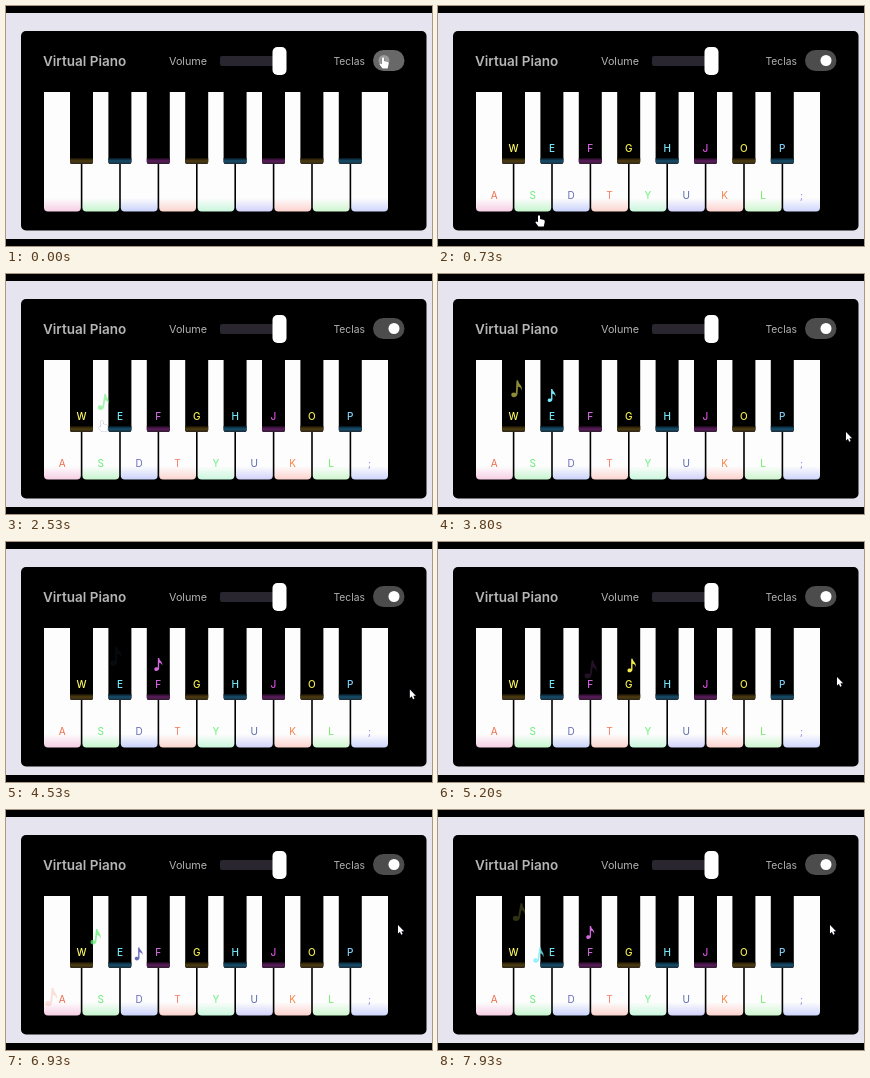
Write an HTML page with a canvas that moves like this. It is 426 px wide and 240 px high and loops after 8000 ms.

```html
<!DOCTYPE html>
<html lang="en">
<head>
<meta charset="utf-8">
<title>Virtual Piano</title>
<style>
  html, body { margin: 0; width: 100%; height: 100%; overflow: hidden; background: #000; }
  canvas { display: block; width: 426px; height: 240px; }
</style>
</head>
<body>
<canvas id="stage"></canvas>
<script>
const LOOP = 8000, KEY_TOP = 86, PITCH = 38.4, FONT = 'Inter, "Open Sans", sans-serif';
const canvas = document.getElementById('stage');
const ctx = canvas.getContext('2d');
const ratio = window.devicePixelRatio || 1;
canvas.width = 426 * ratio;
canvas.height = 240 * ratio;

const whiteLabels = 'ASDTYUKL;';
const blackLabels = 'WEFGHJOP';
const whiteInk = ['#ee6c4c', '#66ee76', '#666cba', '#f87e66', '#66f47a', '#5468b8', '#f48048', '#6cec60', '#8688e0'];
const whiteGlow = ['#f6cde4', '#c4f4cc', '#c8d0fa', '#fad2cc', '#c8f6dc', '#d0d0fa', '#fcd0cc', '#ccf6cc', '#ccd4fc'];
const blackInk = ['#fcf860', '#74ecfc', '#d468e0', '#f8f250', '#74ecfc', '#e04ce0', '#f4ec50', '#80d0fc'];
const blackGlow = ['#4e3d10', '#15506e', '#5c1c5c'];

const whiteCenter = i => 56.3 + i * PITCH;
const blackCenter = i => 75.5 + i * PITCH;

// Each note drifts from the centre of its key towards (dx, dy) while it fades.
const NOTE_LIFE = 800;
const notes = [
  { key: 'S', at: 2030, dx: 5, dy: -27, turn: .25 },
  { key: 'W', at: 3270, dx: 5, dy: -11, turn: .08 },
  { key: 'E', at: 3750, dx: -4, dy: -8, turn: 0 },
  { key: 'F', at: 4470, dx: 1, dy: 6, turn: .15 },
  { key: 'G', at: 5080, dx: 20, dy: 10, turn: .1 },
  { key: 'A', at: 6214, dx: -12, dy: 47, turn: .1 },
  { key: 'S', at: 6547, dx: -10, dy: -38, turn: .2 },
  { key: 'D', at: 6880, dx: -6, dy: -18, turn: 0 },
  { key: 'W', at: 7213, dx: 7, dy: -22, turn: .2 },
  { key: 'E', at: 7546, dx: -27, dy: 48, turn: .3 },
  { key: 'F', at: 7870, dx: 0, dy: 5, turn: .05 }
];

// Pointer stops: time, x, y
const pointerPath = [
  [0, 377, 51], [180, 377, 51], [700, 101, 209], [1000, 101, 209], [1800, 96, 146],
  [2650, 96, 146], [3300, 408, 158], [4200, 408, 158], [4900, 399, 135],
  [5600, 399, 135], [6300, 392, 115], [LOOP, 392, 115]
];

const clamp = v => Math.min(1, Math.max(0, v));
const ease = v => v * v * (3 - 2 * v);

function box(x, y, w, h, radius, fill) {
  ctx.beginPath();
  ctx.roundRect(x, y, w, h, radius);
  ctx.fillStyle = fill;
  ctx.fill();
}

function text(str, x, y, size, color, align = 'left', weight = 400) {
  ctx.font = `${weight} ${size}px ${FONT}`;
  ctx.textAlign = align;
  ctx.fillStyle = color;
  ctx.fillText(str, x, y);
}

function fade(y1, y2, ...colors) {
  const g = ctx.createLinearGradient(0, y1, 0, y2);
  colors.forEach((c, i) => g.addColorStop(i / (colors.length - 1), c));
  return g;
}

function drawHeader(t) {
  text('Virtual Piano', 37, 59.5, 13.5, '#b6b6b6', 'left', 600);
  text('Volume', 163, 58.5, 10.8, '#b2b2b2');
  box(214, 50, 60, 10, 2, '#2a2630');
  box(266.5, 41, 14, 28, 5, '#fff');
  text('Teclas', 327.5, 58.5, 10.3, '#b2b2b2');
  const on = ease(clamp((t - 80) / 300));
  const mix = (a, b) => `rgb(${Array(3).fill(a + (b - a) * on)})`;
  box(367, 44, 31.5, 21, 10.5, mix(104, 76));
  box(372.5 + 10 * on, 49, 11, 11, 5.5, mix(155, 255));
}

function drawKeys(labelled) {
  [...whiteLabels].forEach((label, i) => {
    const x = 38 + i * PITCH;
    box(x, KEY_TOP, 36.8, 119.5, [0, 0, 4, 4], fade(192, 206, '#fdfdfd', whiteGlow[i]));
    if (labelled) text(label, whiteCenter(i), 193, 10, whiteInk[i], 'center');
  });
  [...blackLabels].forEach((label, i) => {
    const x = 64 + i * PITCH;
    box(x, KEY_TOP, 23, 72, [0, 0, 2, 2], '#000');
    box(x, 152, 23, 6, [0, 0, 2, 2], fade(151, 159, '#000', blackGlow[i % 3], '#201c20'));
    if (labelled) text(label, blackCenter(i), 146, 10, blackInk[i], 'center', 500);
  });
}

const quaver = new Path2D(
  'M-.6 3.5 V-6.7 H.8 C1 -3.5 4.8 -3.2 4 1.4 C3.6 -.8 2.2 -1.6 .8 -1.7 ' +
  'V4 C.8 7.4 -4.2 7.8 -4.2 5 C-4.2 3.1 -2.1 2.6 -.6 3.5 Z');

function drawNote({ key, at, dx, dy, turn }, t) {
  const age = (t - at) / NOTE_LIFE;
  if (age < 0 || age >= 1) return;
  const white = whiteLabels.indexOf(key), black = blackLabels.indexOf(key);
  const isWhite = white >= 0;
  const x = isWhite ? whiteCenter(white) : blackCenter(black);
  const y = isWhite ? 145 : 122;
  const scale = .92 + .5 * age;
  ctx.save();
  ctx.translate(x + dx * age, y + dy * age);
  ctx.rotate(turn * age);
  ctx.scale(scale, scale);
  ctx.globalAlpha = 1 - age * age;
  ctx.fillStyle = isWhite ? whiteInk[white] : blackInk[black];
  ctx.fill(quaver);
  ctx.restore();
}

const arrow = new Path2D('M0 0 V8.5 L1.9 6.8 L3.2 9.7 L4.6 9 L3.4 6.2 H6 Z');
const hand = new Path2D(
  'M-1 1 Q0 -.6 1 1 V4 L5 5 Q6 5.3 5.7 7 L4.7 11.5 H-.5 L-3.5 7.6 Q-3.3 5.8 -1 7.3 Z');

function drawPointer(t) {
  const i = pointerPath.findIndex(stop => stop[0] > t);
  const [t0, x0, y0] = pointerPath[i - 1], [t1, x1, y1] = pointerPath[i];
  const p = ease((t - t0) / (t1 - t0));
  const shape = t < 2850 ? hand : arrow;
  ctx.save();
  ctx.translate(x0 + (x1 - x0) * p, y0 + (y1 - y0) * p);
  ctx.lineWidth = .8;
  ctx.strokeStyle = 'rgba(50, 50, 100, .35)';
  ctx.stroke(shape);
  ctx.fillStyle = '#fff';
  ctx.fill(shape);
  ctx.restore();
}

function draw(t) {
  ctx.setTransform(ratio, 0, 0, ratio, 0, 0);
  box(0, 0, 426, 240, 0, '#000');
  box(0, 7, 426, 226, 0, '#e6e5ef');
  box(15, 25, 405.5, 199.5, 5, '#000');
  drawHeader(t);
  drawKeys(t >= 80);
  notes.forEach(note => drawNote(note, t));
  drawPointer(t);
}

const start = performance.now();
function tick() {
  draw((performance.now() - start) % LOOP);
  requestAnimationFrame(tick);
}
tick();
</script>
</body>
</html>
```
